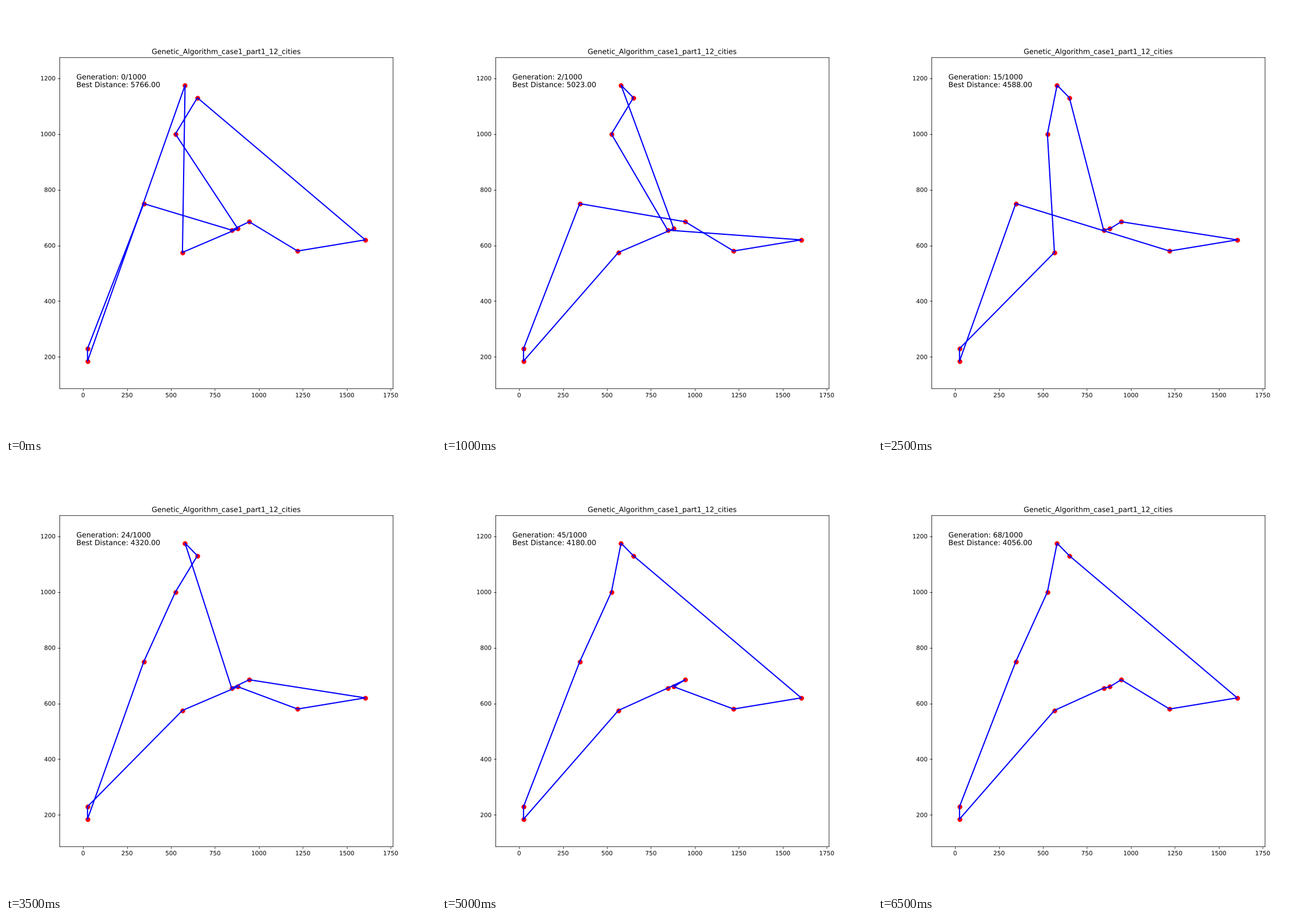
A matplotlib script for the animation above (7000 ms loop, 748 px wide and 748 px high).

```python
import math

import matplotlib.pyplot as plt
from matplotlib.animation import FuncAnimation
from matplotlib.patheffects import Normal

# Draw text, ticks and markers as smooth outlines at sub-pixel positions
plt.rcParams.update({
    "path.snap": False,
    "path.effects": [Normal()],
    "text.hinting": "none",
})

CITIES = {
    "A": (565, 575), "B": (25, 185), "C": (345, 750), "D": (945, 685),
    "E": (845, 655), "F": (880, 660), "G": (25, 230), "H": (525, 1000),
    "I": (580, 1175), "J": (650, 1130), "K": (1605, 620), "L": (1220, 580),
}

# Best tour found so far and the generation it appeared in
STEPS = [
    (0, "AIBGCEDLKJHF"),
    (1, "BJHIAFKLDECG"),
    (2, "ABGCDLKEHJIF"),
    (5, "GCDKLEHJIFAB"),
    (10, "ABGCDFLKEIJH"),
    (15, "BGAHIJEFDKLC"),
    (18, "GBAHIJFDKLEC"),
    (24, "BGAFLKDEIJHC"),
    (30, "BAELKDFIJHCG"),
    (34, "BAFLKDEJIHCG"),
    (45, "BAEDFLKJIHCG"),
    (54, "BAEFKLDJIHCG"),
    (57, "BAEFLKDJIHCG"),
    (68, "BAEFDLKJIHCG"),
]
GENERATIONS = 1000


def closed_path(tour):
    return [CITIES[c] for c in tour + tour[0]]


def length(path):
    return int(sum(math.dist(p, q) for p, q in zip(path, path[1:])))


fig, ax = plt.subplots(figsize=(10, 10), dpi=74.8)
xs, ys = zip(*CITIES.values())
ax.scatter(xs, ys, c="red", s=50)
for set_limits, values in ((ax.set_xlim, xs), (ax.set_ylim, ys)):
    pad = 0.1 * (max(values) - min(values))
    set_limits(min(values) - pad, max(values) + pad)
ax.set_title("Genetic_Algorithm_case1_part1_12_cities")
route, = ax.plot([], [], "b-", lw=2)
info = ax.text(0.05, 0.95, "", transform=ax.transAxes, fontsize=12, va="top")


def update(i):
    generation, tour = STEPS[i]
    path = closed_path(tour)
    route.set_data(*zip(*path))
    info.set_text(f"Generation: {generation}/{GENERATIONS}\n"
                  f"Best Distance: {length(path):.2f}")
    return route, info


anim = FuncAnimation(fig, update, frames=len(STEPS), interval=500,
                     repeat=True, repeat_delay=0)
plt.show()
```
